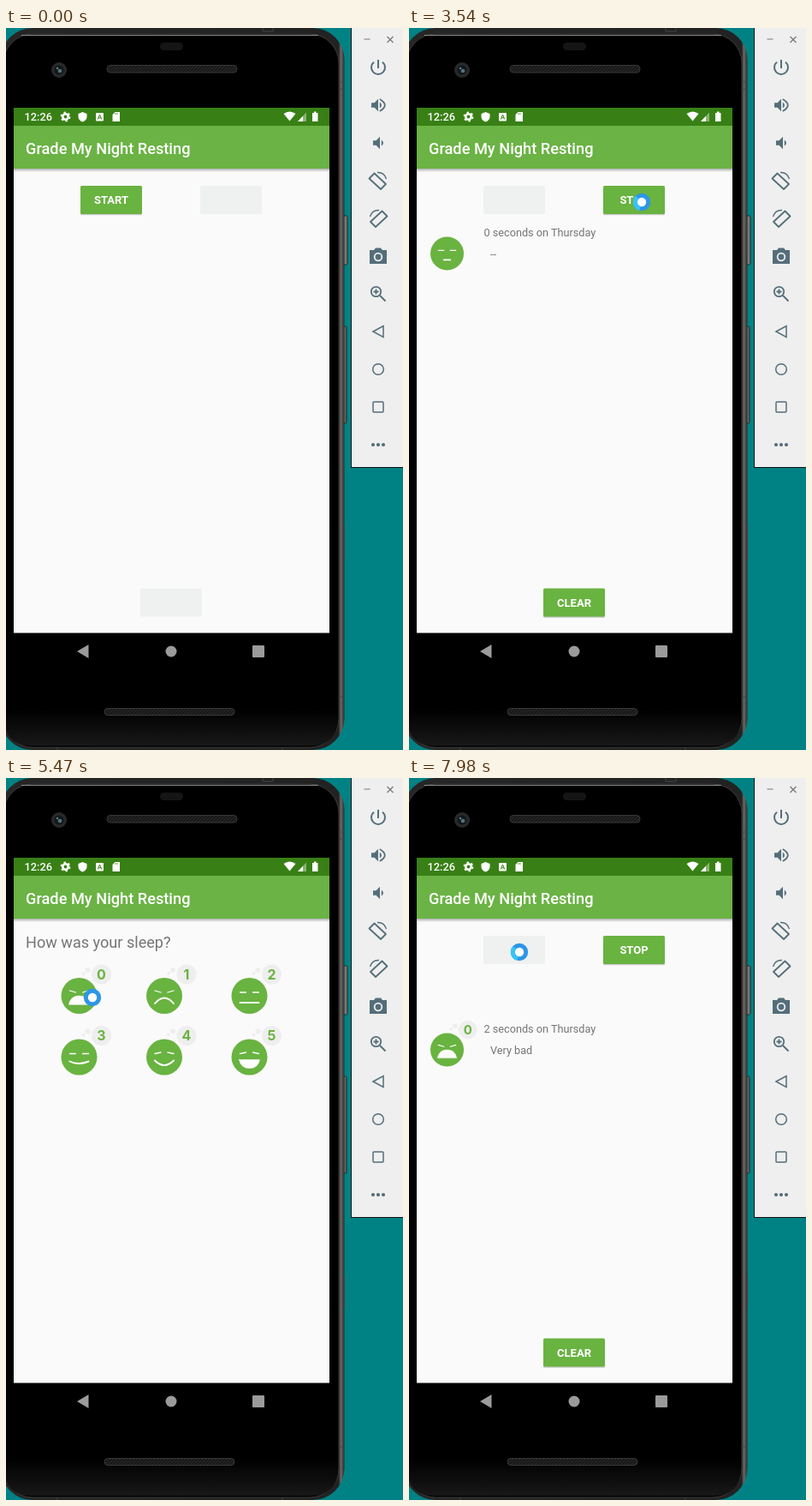
Animation of 464 by 842 pixels, one loop 8000 ms. Source, as an HTML page:

```html
<!DOCTYPE html>
<html lang="en">
<head>
<meta charset="utf-8">
<title>Sleep tracker demo</title>
<style>
  html, body { margin: 0; width: 100%; height: 100%; overflow: hidden; background: #008285; }
  svg { display: block; width: 464px; height: 842px; font-family: Roboto, sans-serif; }
  .label { font-size: 13px; font-weight: 700; fill: #fff; text-anchor: middle; }
  .score { font: 700 16px Inter, sans-serif; fill: #69b341; text-anchor: middle; }
  .grey { fill: #757575; }
  .white { fill: none; stroke: #fff; stroke-width: 1.9; stroke-linecap: round; stroke-linejoin: round; }
  .tool { fill: none; stroke: #546e7a; stroke-width: 1.8; }
  .tool .solid { fill: #546e7a; stroke: none; }
</style>
</head>
<body>
<svg viewBox="0 0 464 842">
  <defs>
    <clipPath id="screen"><rect x="9" y="93" width="369" height="612.5"/></clipPath>
    <pattern id="mesh" width="4" height="4" patternUnits="userSpaceOnUse">
      <rect width="4" height="4" fill="#191919"/><path d="M0 4L4 0" stroke="#2c2c2c"/>
    </pattern>
    <linearGradient id="chin" x2="0" y2="1">
      <stop offset=".4" stop-color="#000"/><stop offset="1" stop-color="#181818"/>
    </linearGradient>
    <linearGradient id="rim" x2="1" y2="0">
      <stop offset="0" stop-color="#262626"/><stop offset=".983" stop-color="#222"/>
      <stop offset=".99" stop-color="#6a6863"/><stop offset="1" stop-color="#2c2c2c"/>
    </linearGradient>
    <linearGradient id="shade" x2="0" y2="1">
      <stop offset="0" stop-color="#000" stop-opacity=".3"/><stop offset="1" stop-color="#000" stop-opacity="0"/>
    </linearGradient>
  </defs>

  <rect width="464" height="842" fill="#008285"/>

  <!-- phone body -->
  <rect x="392" y="219" width="7" height="57" rx="1.5" fill="#777" stroke="#252525"/>
  <rect x="392" y="348" width="6" height="113" rx="1.5" fill="#666" stroke="#252525"/>
  <path d="M395.5 579v41" stroke="#555"/>
  <rect x="-6" y="0" width="401.5" height="842" rx="37" fill="url(#rim)"/>
  <rect x="-3" y="7" width="392" height="832" rx="34" stroke="#3c3c3c"/>
  <path d="M18 8.5H365" stroke="#8b8b88"/>
  <path d="M300 0v4h12V0M389 63h6m-6 8h6M389 780h6M60 839v3M323 839v3" fill="none" stroke="#444"/>
  <path d="M-2 765H388V805Q388 837 355 837H30Q-2 837-2 805Z" fill="url(#chin)"/>
  <rect x="180" y="17" width="27" height="9" rx="4.5" fill="#151515"/>
  <circle cx="62" cy="49" r="9" fill="#292929"/><circle cx="62" cy="49" r="5.5" fill="#11191c"/>
  <circle cx="63" cy="50" r="2.3" fill="#55737d"/><circle cx="60" cy="47" r="1.2" fill="#718087"/>
  <rect x="118" y="43.5" width="152" height="8.5" rx="4" fill="url(#mesh)" stroke="#383838"/>
  <rect x="115" y="793.5" width="152" height="8" rx="4" fill="url(#mesh)" stroke="#383838"/>

  <!-- screen -->
  <rect x="9" y="93" width="369" height="612.5" fill="#fafafa"/>
  <g id="app" clip-path="url(#screen)"></g>
  <rect x="9" y="164" width="369" height="4" fill="url(#shade)"/>
  <rect x="9" y="93" width="369" height="21" fill="#388015"/>
  <rect x="9" y="114" width="369" height="50" fill="#6ab344"/>
  <text x="21.5" y="108" font-size="12.8" font-weight="500" fill="#fff">12:26</text>
  <text x="23" y="146.5" font-size="18.2" font-weight="500" fill="#fff">Grade My Night Resting</text>
  <g fill="#fff">
    <circle cx="69.5" cy="103.5" r="3.2" fill="none" stroke="#fff" stroke-width="2.6"/>
    <circle cx="69.5" cy="103.5" r="5" fill="none" stroke="#fff" stroke-width="1.8" stroke-dasharray="2.4 2.836"/>
    <path d="M89.5 98l5 2v3.5q0 4-5 6q-5-2-5-6V100z"/>
    <rect x="105" y="99" width="9" height="9.5" rx="1"/>
    <path d="M127.500 98h5.500v11h-8.500v-8z"/>
    <path d="M324.500 100q7-5 14 0l-7 8.500z"/>
    <path d="M341 109l10-10.500V109z" opacity=".4"/><path d="M341 109l6-6.300V109z"/>
    <path d="M358 99h2v-1.500h2.500V99h2v10H358z"/>
  </g>
  <path d="M107.300 106.500l2.200-5.500 2.200 5.500m-3.500-1.700h2.600" fill="none" stroke="#388015"/>
  <path d="M128 99v2m2-2v2" stroke="#388015" stroke-width=".8"/>
  <g fill="#9b9b9b">
    <path d="M83 727l13.500-8v16z"/><circle cx="193" cy="727" r="6.5"/>
    <rect x="288" y="720" width="14" height="14" rx="1"/>
  </g>

  <!-- tool panel -->
  <path d="M403 0h61v513h-61z" fill="#111"/><path d="M404 0h60v512h-60z" fill="#efefef"/>
  <path d="M418.500 13h7M445.500 10l7 7m0-7l-7 7" stroke="#777" stroke-width="1.2"/>
  <g id="tools" class="tool"></g>

  <g id="cursor">
    <circle r="7.7" fill="#fff" stroke="#2e96e6" stroke-width="5"/>
    <path id="glint" d="M-2 7.400A7.700 7.700 0 0 1-5.500-5.400" fill="none" stroke="#37c4f6" stroke-width="5"/>
  </g>
</svg>

<script>
const LOOP = 8000, GREEN = '#69b341', ROW = 54;
const $ = id => document.getElementById(id);
const between = (t, from, to) => t >= from && t < to;
const ease = p => (1 - Math.cos(Math.PI * Math.min(1, Math.max(0, p)))) / 2;

const speaker = '<path class="solid" d="M-8-2.700h3.600L0-7.200V7.200l-4.400-4.500H-8zM1.800-3.600q4.400 3.600 0 7.200z"/>';
const rotate = `<path d="M-4.500-8.500L9 4 3 10-10.500-2.500z" stroke-linejoin="round"/>
  <path d="M-1-9.500Q7-10 9.500-2" stroke-width="1.400"/>`;
$('tools').innerHTML = [
  '<path d="M-5-6.300a8 8 0 1 0 10 0M0-9V1" stroke-width="2"/>',
  `${speaker}<path d="M1.800-7q12 7 0 14"/>`,
  `<g transform="translate(2)">${speaker}</g>`,
  rotate,
  `<g transform="scale(-1 1)">${rotate}</g>`,
  `<path class="solid" d="M-10-7h5l2-2.500h6l2 2.500h5V9h-20z"/>
   <circle cy="1" r="4.300" fill="#546e7a" stroke="#efefef"/>`,
  '<circle cx="-2.500" cy="-2.500" r="5.700"/><path d="M2 2L8.500 8.500M-5.500-2.500h6M-2.500-5.500v6"/>',
  '<path d="M-6 0L6-6.500v13z" stroke-width="1.500"/>',
  '<circle r="6.300" stroke-width="1.500"/>',
  '<rect x="-6" y="-6" width="12" height="12" rx="1" stroke-width="1.500"/>',
  '<path d="M-6 0h.01M0 0h.01M6 0h.01" stroke-width="4.200" stroke-linecap="round"/>'
].map((icon, i) => `<g transform="translate(435 ${46 + 44 * i})">${icon}</g>`).join('');

const flatEyes = 'M-11-4h7M4-4h7';
const squintEyes = 'M-11-6l7 2M11-6l-7 2';
const wideEyes = 'M-11-4l7-1.500M11-4l-7-1.500';
const moods = [
  [squintEyes, 'M-12 10Q-10 0 0 0T12 10z', true],
  [squintEyes, 'M-11 9Q0-4 11 9'],
  [flatEyes, 'M-11 8H11'],
  [flatEyes, 'M-11 5Q-1 10 11 5'],
  [wideEyes, 'M-11 4Q0 15 11 4'],
  [wideEyes, 'M-12 3H12Q10 13 0 13T-12 3z', true]
];
const asleep = [flatEyes, 'M-4 8H4'];

function face(x, y, [eyes, mouth, open], score = '', scale = 1) {
  const badge = score === '' ? '' : `<g fill="#eee">
    <circle cx="26" cy="-25" r="11.500"/><circle cx="10" cy="-30" r="3"/><circle cx="5" cy="-26" r="2"/></g>
    <text class="score" x="26" y="-19.200">${score}</text>`;
  return `<g transform="translate(${x} ${y}) scale(${scale})">
    <circle r="21" fill="${GREEN}"/>${badge}
    <path class="white" d="${eyes}" style="stroke-width:1.300"/>
    <path class="white" d="${mouth}" ${open ? 'style="fill:#fff;stroke-width:.6"' : ''}/></g>`;
}

function button(x, y, label, enabled, pressed) {
  const box = `x="${x}" width="72" height="33" rx="1.500"`;
  if (!enabled) return `<rect ${box} y="${y}" fill="#eff1f1"/>`;
  return `<rect ${box} y="${y + 1.2}" fill="#000" opacity=".2"/>
    <rect ${box} y="${y}" fill="${GREEN}"/>
    ${pressed ? `<rect ${box} y="${y}" fill="#fff" opacity=".25"/>` : ''}
    <text class="label" x="${x + 36}" y="${y + 21.3}">${label}</text>`;
}

function listItem(y, opacity, rated) {
  return `<g class="grey" font-size="12.700" transform="translate(0 ${y})" opacity="${opacity}">
    ${rated ? face(44.5, 263, moods[0], 0, .93) : face(44.5, 263, asleep, '', .93)}
    <text x="87.500" y="243">${rated ? 2 : 0} seconds on Thursday</text>
    <text x="95" y="267.500">${rated ? 'Very bad' : '--'}</text></g>`;
}

function home(t) {
  const tracking = between(t, 2300, 4400) || t >= 7520;
  const rated = t >= 5790;
  const shownAt = rated ? 6020 : 2760;
  const shift = t < 7830 ? 0 : ROW * ease((stepped(t, 7830, 7980, 3) + .5) / 1.5);
  return button(87, 184, 'START', !tracking, between(t, 2150, 2300) || t >= 7370)
    + button(227, 184, 'STOP', tracking, between(t, 4240, 4400))
    + button(157, 653.5, 'CLEAR', t >= 2300)
    + (t >= shownAt ? listItem(shift, t < shownAt + 80 ? .5 : 1, rated) : '');
}

function rating(t) {
  const time = 4700 + 770 * stepped(t, 4700, 5470, 11);
  const offset = t < 4700 ? 369 : 369 * (1 - ease((time - 4555) / 712));
  return `<g transform="translate(${offset})">
    <text class="grey" x="23" y="198" font-size="18.100">How was your sleep?</text>
    ${moods.map((mood, i) => face(85.5 + 99.5 * (i % 3), i < 3 ? 254 : 325.5, mood, i)).join('')}</g>`;
}

// Progress from 0 to 1 in evenly timed jumps.
function stepped(t, start, end, steps) {
  const p = (t - start) / (end - start) * (steps - 1);
  return Math.min(1, Math.max(0, Math.floor(p + .05) / (steps - 1)));
}

// Pointer trips: start, end, steps, evenly timed points.
const trips = [
  [680, 1440, 11, [[379, 808], [282, 553], [135, 224]]],
  [1840, 1920, 2, [[132, 221], [128, 217]]],
  [3220, 3540, 5, [[146, 216], [272, 203]]],
  [4700, 5470, 11, [[259, 209], [185, 264], [101, 256]]],
  [6330, 6970, 9, [[115, 242], [127, 213], [129, 203]]]
];

function cursorAt(t) {
  const [start, end, steps, points] = trips.findLast(trip => t >= trip[0]);
  const p = stepped(t, start, end, steps) * (points.length - 1);
  const i = Math.min(points.length - 2, Math.floor(p));
  return points[i].map((v, axis) => v + (points[i + 1][axis] - v) * (p - i));
}

let lastMarkup;
function draw() {
  const t = performance.now() % LOOP;
  const markup = between(t, 4550, 5790) ? rating(t) : home(t);
  if (markup !== lastMarkup) $('app').innerHTML = lastMarkup = markup;
  const visible = t >= trips[0][0];
  $('cursor').style.display = visible ? '' : 'none';
  if (visible) $('cursor').setAttribute('transform', `translate(${cursorAt(t)})`);
  $('glint').style.display = between(t, 4090, 5640) ? 'none' : '';
  requestAnimationFrame(draw);
}
draw();
</script>
</body>
</html>
```
